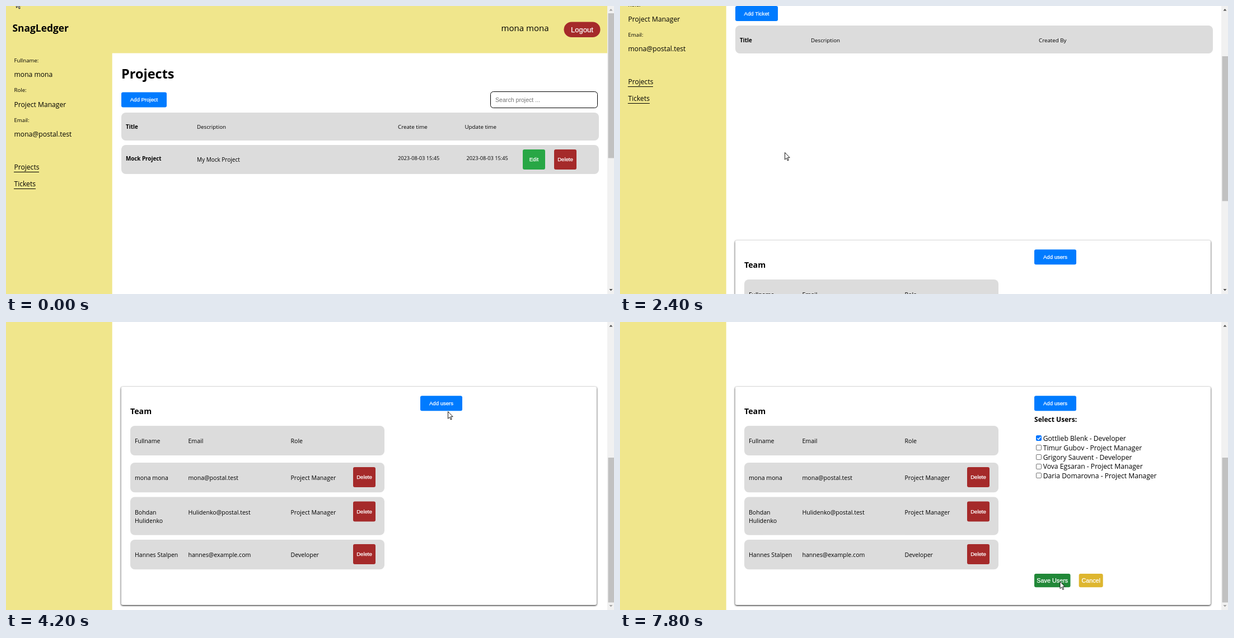
An HTML page for the animation above (8 s loop, 1086 px wide and 516 px high).

```html
<!DOCTYPE html>
<html lang="en">
<head>
<meta charset="utf-8">
<title>Issue board</title>
<style>
html, body { margin: 0; width: 100%; height: 100%; overflow: hidden; background: #fff; }
svg { display: block; font-family: "Open Sans", "Noto Sans", sans-serif; }
text { white-space: pre; }
.ui { font-family: "Liberation Sans", Arial, sans-serif; }
.label { fill: #fff; stroke: #fff; stroke-width: .25; text-anchor: middle; }
.card { filter: drop-shadow(0 1.5px 1.5px rgba(0, 0, 0, .95)); }
</style>
</head>
<body>
<svg id="stage" width="1086" height="516" viewBox="0 0 1086 516"></svg>
<script>
const LOOP = 8000, STEP = 100, MAX_SCROLL = 457;
const KHAKI = '#f0e68c', GREY = '#dcdcdc', BLUE = '#007bff', RED = '#a52a2a', GREEN = '#28a745';
const USER = 'mona mona', MAIL = 'mona@postal.test', ROLE = 'Project Manager';

// time, x, y of the pointer tip
const POINTER = [
  [200, 18, -10], [500, 60, 15], [800, 140, 95], [1100, 278, 262], [1200, 281, 270],
  [1700, 281, 270], [2100, 294, 262], [2900, 294, 262], [3300, 490, 322], [3600, 643, 325],
  [3700, 643, 325], [4200, 789, 160], [4400, 786, 151], [5200, 786, 151], [5800, 793, 207],
  [6400, 793, 207], [7100, 790, 335], [7200, 790, 338], [7700, 785.5, 464.5]
];
const SCROLL = [[2200, 0], [2300, 65], [2400, 153], [2500, 265], [2600, 385], [2700, MAX_SCROLL]];

// Linear interpolation between keyed rows
function along(keys, t) {
  const i = keys.findIndex(k => k[0] > t);
  if (i < 0) return keys.at(-1).slice(1);
  if (i === 0) return keys[0].slice(1);
  const a = keys[i - 1], b = keys[i], p = (t - a[0]) / (b[0] - a[0]);
  return a.slice(1).map((v, j) => v + (b[j + 1] - v) * p);
}

const rect = (x, y, w, h, fill, r = 0, extra = '') =>
  `<rect x="${x}" y="${y}" width="${w}" height="${h}" rx="${r}" fill="${fill}" ${extra}/>`;
// y is the middle of the capital letters
const text = (x, y, size, str, extra = '') =>
  `<text x="${x}" y="${y + size * .36}" font-size="${size}" ${extra}>${str}</text>`;
const bold = (x, y, size, str) => text(x, y, size, str, 'font-weight="700"');
const button = (x, y, w, h, fill, label, size = 9.6, r = 3) =>
  rect(x, y, w, h, fill, r) +
  text(x + w / 2, y + h / 2, size, label, 'class="ui label"');
const group = (x, y, inner) => `<g transform="translate(${x} ${y})">${inner}</g>`;

function frame(known) {
  const user = (x, y, size, str) => known ? text(x, y, size, str) : '';
  const link = (y, label, w) => text(14.5, y, 12.1, label) + rect(14, Math.round(y + 8.4), w, 1, '#000');
  return rect(0, 0, 1074, 84.5, KHAKI) + rect(0, 0, 189.7, 1000, KHAKI) +
    bold(11.5, 40, 17.4, 'SnagLedger') +
    user(884.5, 40, 15, USER) +
    button(996.5, 28.5, 65, 27.5, RED, 'Logout', 13, 13.75) +
    text(14.5, 97.5, 9.65, 'Fullname:') + user(14.5, 123, 12.15, USER) +
    text(14.5, 151, 9.65, 'Role:') + user(14.5, 176.5, 12.15, ROLE) +
    text(14.5, 204.5, 9.65, 'Email:') + user(14.5, 230, 12.15, MAIL) +
    link(289, 'Projects', 45) + link(318.5, 'Tickets', 39);
}

function projects(rowFill) {
  return bold(206, 121.5, 23.5, 'Projects') +
    button(206, 154.5, 81, 27, BLUE, 'Add Project') +
    rect(865.5, 153.5, 191, 29, '#fff', 5, 'stroke="#000"') +
    text(874, 168, 10.6, 'Search project ...', 'class="ui" fill="#757575"') +
    rect(206, 191, 853, 50, GREY, 8) +
    bold(214, 216.5, 9.8, 'Title') + text(341, 216.5, 9.75, 'Description') +
    text(700, 216.5, 9.75, 'Create time') + text(819.5, 216.5, 9.75, 'Update time') +
    rect(206, 249, 853, 52, rowFill, 8) +
    bold(214, 273, 9.8, 'Mock Project') + text(341, 275, 10, 'My Mock Project') +
    text(700, 273, 9.25, '2023-08-03 15:45') + text(822.5, 273, 9.25, '2023-08-03 15:45') +
    button(923, 257, 40, 36, GREEN, 'Edit') + button(979, 257, 40, 36, RED, 'Delete');
}

function tickets() {
  return bold(206, 121.5, 23.5, 'Tickets') +
    button(206, 153, 76, 27, BLUE, 'Add Ticket') +
    rect(206, 188, 853, 50, GREY, 8) +
    bold(214, 214, 9.8, 'Title') + text(341, 214, 9.75, 'Description') +
    text(748, 214, 9.75, 'Created By');
}

function teamRow(y, h, names, mail, role, removable = true) {
  const mid = y + 27.3;
  return rect(222, y, 454, h, GREY, 8) +
    names.map((n, i) => text(230, mid + i * 15, 10.57, n)).join('') +
    text(325.5, mid, 10.57, mail) + text(508.5, mid, 10.57, role) +
    (removable ? button(620, y + 8, 40, 36, RED, 'Delete') : '');
}

function team(t) {
  const hoverAdd = t >= 4300 && t < 5000;
  return rect(205.7, 116, 849.3, 391, '#fff', 3, 'class="card"') +
    bold(222, 160, 14.2, 'Team') +
    button(740, 132.3, 75, 27, hoverAdd ? '#0056b3' : BLUE, 'Add users') +
    teamRow(186, 53, ['Fullname'], 'Email', 'Role', false) +
    teamRow(252, 53.3, [USER], MAIL, ROLE) +
    teamRow(313.4, 68.4, ['Bohdan', 'Hulidenko'], 'Hulidenko@postal.test', ROLE) +
    teamRow(390, 53.3, ['Hannes Stalpen'], 'hannes@example.com', 'Developer') +
    (t >= 4800 ? picker(t) : '');
}

function picker(t) {
  const people = [
    'Gottlieb Blenk - Developer', 'Timur Gubov - ' + ROLE, 'Grigory Sauvent - Developer',
    'Vova Egsaran - ' + ROLE, 'Daria Domarovna - ' + ROLE
  ];
  const list = people.map((who, i) => {
    const y = 208.3 + i * 16.75, on = i === 0 && t >= 6400;
    const edge = on ? '#0075ff' : i === 0 && t >= 5700 ? '#4f4f4f' : '#767676';
    return rect(743.5, Math.round(y - 5) + .5, 9, 9, on ? '#0075ff' : '#fff', 1.5, `stroke="${edge}"`) +
      (on ? `<path d="M745.3 ${y}l2.2 2.2 4-4.8" fill="none" stroke="#fff" stroke-width="1.5"/>` : '') +
      text(755.7, y + .4, 12.15, who);
  }).join('');
  return bold(740, 174.5, 12.05, 'Select Users:') + list +
    button(740, 451, 64.5, 24.3, t >= 7600 ? '#218838' : GREEN, 'Save Users', 10.8) +
    button(819.7, 451, 43, 24.3, '#deb62f', 'Cancel', 10.8);
}

function scrollbar(top) {
  const arrow = (y, dy, live) =>
    `<path d="M1077.5 ${y}h6l-3 ${dy}z" fill="${live ? '#505050' : '#a3a3a3'}"/>`;
  return rect(1074, 0, 12, 516, '#f1f1f1') +
    rect(1075.5, 13 + top / MAX_SCROLL * 230, 10.5, 259.5, '#c1c1c1') +
    arrow(8.5, -3.5, top > 0) + arrow(507, 3.5, top < MAX_SCROLL);
}

function pointer(t) {
  const [x, y] = along(POINTER, t), hand = t >= 1100 && t < 1700;
  const shape = hand
    ? 'M4 11V2a1.4 1.4 0 0 1 2.8 0v5q1.6-.9 2.4.4 1.6-.7 2.3.5 2.2-.5 2.2 1.6v4q0 2-1.5 3.5v2H5.5v-2L1 11.8q-1.2-2 .6-2.2 1 0 2.4 1.8z'
    : 'M.5.5V13.2L3.4 10.4 5.3 15 7.2 14.2 5.3 9.7H9.2Z';
  return group(hand ? x - 5 : x, y, `<path d="${shape}" fill="#fff" stroke="#000" stroke-width=".9"/>`);
}

function scene(t) {
  const [top] = along(SCROLL, t);
  const rowFill = t < 1100 ? GREY : t < 1200 ? '#e8e2aa' : KHAKI;
  const loaded = t < 1600 || t >= 2000;
  const page = t < 1600 ? projects(rowFill)
    : t < 1700 ? '' : tickets() + group(0, MAX_SCROLL, team(t));
  return rect(0, 0, 1086, 516, '#fff') + group(0, -top, frame(loaded) + page) +
    scrollbar(top) + pointer(t);
}

const stage = document.getElementById('stage');
let shown = -1;
function draw() {
  const t = Math.floor(performance.now() % LOOP / STEP) * STEP;
  if (t !== shown) stage.innerHTML = scene(shown = t);
  requestAnimationFrame(draw);
}
draw();
</script>
</body>
</html>
```
